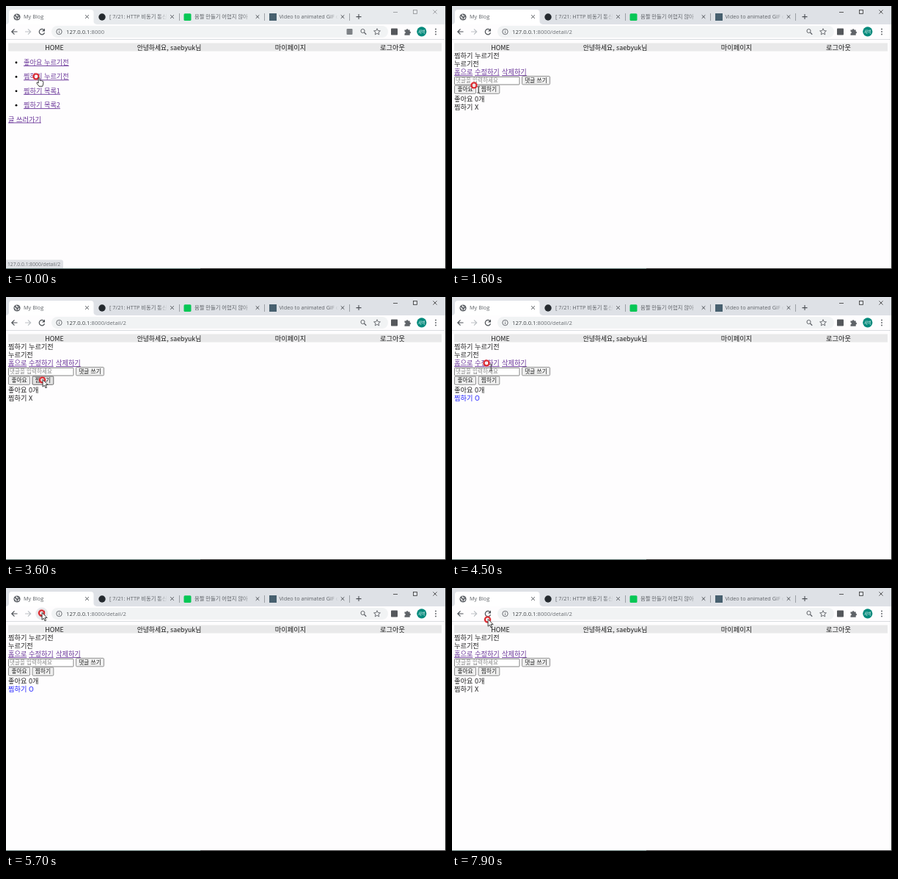
Recreate the animation shown at these times as an HTML page. Size 600 by 358 pixels, loop 8 s.

```html
<!DOCTYPE html>
<html lang="ko">
<head>
<meta charset="utf-8">
<title>My Blog</title>
<style>
  html, body { margin: 0; width: 100%; height: 100%; overflow: hidden; background: #fff; }
  svg { display: block; width: 600px; height: 358px; --strip: #dee1e6; --control: #333; }
  svg.inactive { --strip: #e7eaed; --control: #8e9195; }
  text { white-space: pre; }
  .ui { font-family: "Open Sans", "Noto Sans CJK KR", sans-serif; }
  .page { font-family: "Noto Sans CJK KR", "Noto Sans", sans-serif; font-weight: 300; fill-opacity: .88; }
  .link { text-decoration: underline; text-decoration-thickness: .7px; }
  .strip { fill: var(--strip); }
  .control { stroke: var(--control); }
  #fade stop { stop-color: var(--strip); }
</style>
</head>
<body>
<svg id="stage" viewBox="0 0 600 358" xmlns="http://www.w3.org/2000/svg">
  <defs>
    <linearGradient id="fade">
      <stop offset="0" stop-opacity="0"/>
      <stop offset="1"/>
    </linearGradient>
  </defs>
</svg>
<script>
const stage = document.getElementById('stage');

function add(parent, tag, attrs, content) {
  const node = document.createElementNS('http://www.w3.org/2000/svg', tag);
  for (const key in attrs) node.setAttribute(key, attrs[key]);
  if (content !== undefined) node.textContent = content;
  parent.appendChild(node);
  return node;
}
const group = (parent = stage) => add(parent, 'g', {});
const rect = (p, x, y, width, height, fill, more) =>
  add(p, 'rect', { x, y, width, height, fill, ...more });
const dot = (p, cx, cy, r, fill, more) => add(p, 'circle', { cx, cy, r, fill, ...more });
const line = (p, d, stroke = '#5f6368', width = 1.1, more) =>
  add(p, 'path', { d, stroke, 'stroke-width': width, fill: 'none', ...more });
const ui = (p, x, y, size, fill, str) =>
  add(p, 'text', { x, y, fill, 'font-size': size, class: 'ui' }, str);
const label = (p, x, y, str, more) =>
  add(p, 'text', { x, y, fill: '#000', 'font-size': 9.2, class: 'page', ...more }, str);
const link = (p, x, y, str) => label(p, x, y, str, { class: 'page link', fill: '#551a8b' });
const show = (node, on) => node.setAttribute('visibility', on ? 'visible' : 'hidden');
const cross = (x, y, r, color, width, more) =>
  line(stage, `M${x - r} ${y - r}l${2 * r} ${2 * r}m0 ${-2 * r}l${-2 * r} ${2 * r}`, color, width, more);

// Window and tab strip
rect(stage, 0, 0, 600, 358, '#fefdfe');
rect(stage, 0, 0, 600, 25, '', { class: 'strip' });
add(stage, 'path', { d: 'M0 25Q4 24.5 4 21V9Q4 5 8 5H115.500Q119.500 5 119.500 9V21Q119.500 24.500 124 25Z', fill: '#fff' });

function tabTitle(x, end, str) {
  ui(stage, x, 17, 7.3, '#5f6368', str);
  if (!end) return;
  rect(stage, end - 13, 9, 13, 12, 'url(#fade)');
  rect(stage, end, 9, 14, 12, '', { class: 'strip' });
}
tabTitle(24, 0, 'My Blog');
tabTitle(141, 220, '[ 7/21: HTTP 비동기 통신');
tabTitle(257, 336, '움짤 만들기 어렵지 않아');
tabTitle(372.5, 453, 'Video to animated GIF c');

dot(stage, 15, 15, 4.6, '#5f6368');
line(stage, 'M11.500 14.500l2 1.200 .5 2.500M14 11.500l.5 1.700 2.300 .5M16 17.500l2-2', '#fff', 1.2);
dot(stage, 131, 15, 4.7, '#24292e');
rect(stage, 242.5, 10.2, 10, 9.8, '#06c755', { rx: 1.5 });
rect(stage, 359, 10, 10, 10, '#47606f');
for (const x of [110.500, 226.500, 343, 459]) cross(x, 14.6, 2.3, '#4d5156', 1);
for (const x of [236.500, 352.500, 468.500]) line(stage, `M${x} 10V20`, '#8b8f94', 0.8);
line(stage, 'M477.500 14.600h7M481 11.100v7', '#4d5156', 1.1);
const control = { class: 'control' };
line(stage, 'M528 8.500h6', '', 0.8, control);
rect(stage, 555.500, 5.500, 5, 5, 'none', { 'stroke-width': 0.8, ...control });
cross(585, 8, 2.6, '', 0.8, control);

// Toolbar
line(stage, 'M0 45.500H598', '#dadce0', 1);
rect(stage, 62, 27, 459, 16, '#f1f3f4', { rx: 8 });
line(stage, 'M15.500 35H8M11.500 31.300L7.800 35l3.700 3.700', '#4d5156', 1.2);
line(stage, 'M26 35h7.500M30 31.300l3.700 3.700-3.700 3.700', '#bdc1c6', 1.2);
const halo = dot(stage, 48.8, 35, 8.5, '#e8eaed');
line(stage, 'M52 33A3.700 3.700 0 1 0 52.500 36.300', '#4d5156', 1.2);
add(stage, 'path', { d: 'M53 30.500v4h-4z', fill: '#4d5156' });
dot(stage, 72.500, 35, 3.7, 'none', { stroke: '#5f6368', 'stroke-width': 0.9 });
line(stage, 'M72.500 34.500v2.400M72.500 32.700v.9', '#5f6368', 0.9);

const url = ui(stage, 82, 38, 7.68, '#3c4043', '127.0.0.1');
const urlTail = add(url, 'tspan', { fill: '#6b6f74' });
const translate = rect(stage, 464.500, 31, 8, 8, '#7d8185', { rx: 1 });
dot(stage, 486.500, 34, 2.6, 'none', { stroke: '#5f6368', 'stroke-width': 1 });
line(stage, 'M488.500 36l2.700 2.700', '#5f6368', 1.3);
add(stage, 'path', {
  d: 'M506 30.700l1.250 2.900 3.150.25-2.400 2.050.75 3.050-2.750-1.650-2.750 1.650.75-3.050-2.400-2.050 3.150-.25z',
  fill: 'none', stroke: '#5f6368', 'stroke-width': 0.9
});
rect(stage, 525, 30.500, 9, 9, '#55585c', { rx: 0.8 });
add(stage, 'path', {
  d: 'M543.500 32.500h2.300a1.300 1.300 0 0 1 2.600 0h2.300v2.300a1.300 1.300 0 0 1 0 2.600v2.300h-7.200v-2.300a1.300 1.300 0 0 0 0-2.600z',
  fill: '#5f6368'
});
dot(stage, 566.800, 34.800, 6.6, '#00897b');
label(stage, 566.800, 36.700, '새벽', { fill: '#fff', 'font-size': 5.2, 'text-anchor': 'middle' });
for (const y of [31.500, 35, 38.500]) dot(stage, 586, y, 0.95, '#5f6368');

// Navigation shared by both pages
rect(stage, 3, 50.500, 591, 11, '#e9e9ea');
const nav = (x, str, size = 9.2) =>
  label(stage, x, 59.500, str, { 'text-anchor': 'middle', 'font-size': size });
nav(66, 'HOME', 8.8);
nav(222.500, '안녕하세요, saebyuk님', 8.8);
nav(388, '마이페이지');
nav(527, '로그아웃');

// List page
const home = group();
['좋아요 누르기전', '찜하기 누르기전', '찜하기 목록1', '찜하기 목록2'].forEach((str, i) => {
  const y = 80 + i * 19.400;
  dot(home, 14, y - 3, 1.4, '#000');
  link(home, 24, y, str);
});
link(home, 3, 157.500, '글 쓰러가기');
add(home, 'path', { d: 'M0 345.500H75Q78 345.500 78 348.500V358H0Z', fill: '#dfe1e5' });
ui(home, 2, 353.600, 6.75, '#6b6f74', '127.0.0.1:8000/detail/2');

// Detail page
const detail = group();
label(detail, 3, 70.800, '찜하기 누르기전');
label(detail, 3, 81.800, '누르기전');
link(detail, 3, 93.200, '홈으로');
link(detail, 31, 93.200, '수정하기');
link(detail, 68, 93.200, '삭제하기');
rect(detail, 3.500, 96.500, 88.500, 10.500, '#fff', { stroke: '#767676', 'stroke-width': 0.9, rx: 0.7 });
label(detail, 5, 104.300, '댓글을 입력하세요', { 'font-size': 7.6, fill: '#757575' });

function button(x, y, width, str) {
  const box = rect(detail, x, y, width, 11.300, '#efefef', { stroke: '#767676', 'stroke-width': 0.8, rx: 1.2 });
  label(detail, x + width / 2, y + 8.400, str, { 'font-size': 7.7, 'text-anchor': 'middle' });
  return { box, x, y, width };
}
const buttons = [
  button(95.500, 95.600, 38, '댓글 쓰기'),
  button(3.500, 108, 29, '좋아요'),
  button(36, 108, 28.800, '찜하기')
];
label(detail, 3, 129.700, '좋아요 0개');
const wish = label(detail, 3, 140.700, '찜하기 X');

// Window edges
rect(stage, 599, 0, 1, 358, '#202020');
rect(stage, 0, 357, 265, 1, '#5b706e');
rect(stage, 265, 357, 335, 1, '#303030');

// Pointer: the shapes hang from the centre of the ring
const pointer = group();
dot(pointer, 0, 0, 5, 'none', { stroke: '#f4a4a6', 'stroke-width': 0.7, 'stroke-opacity': 0.6 });
dot(pointer, 0, 0, 3.5, '#fff', { 'fill-opacity': 0.65, stroke: '#dc2a30', 'stroke-width': 2.2 });
const shapes = {
  arrow: group(pointer),
  beam: group(pointer),
  hand: group(pointer)
};
const outline = { fill: '#fff', stroke: '#111', 'stroke-width': 0.8, 'stroke-linejoin': 'round' };
add(shapes.arrow, 'path', { d: 'M.6-.6V9.200L2.900 7.200 4.500 10.800 6.100 10.100 4.500 6.600H7.600Z', ...outline });
line(shapes.beam, 'M4.300 1.800H5.600L6.200 2.300 6.800 1.800H8.100M6.200 2.300V9.700M4.300 10.200H5.600L6.200 9.700 6.800 10.200H8.100', '#222', 0.8);
add(shapes.hand, 'path', {
  d: 'M3.200 1.300Q4.200.2 5 1.300V4.700Q6 4 6.700 5 7.700 4.400 8.300 5.400 9.600 5 9.800 6.500V9.200L8.800 12.500H4L1 8.500Q.5 7.200 2 7.200L3.200 8.200Z',
  transform: 'translate(0 .8)', ...outline
});

// Pointer path: time in ms, x, y
const path = [
  [0, 41, 96], [600, 41, 96], [900, 38, 118], [1200, 37, 123], [1500, 44, 112],
  [1600, 30, 108], [1700, 39, 95], [1800, 45, 82], [1900, 45, 82],
  [2000, 48, 48], [2100, 48, 35], [2200, 48, 37], [2400, 49, 109],
  [3000, 49, 109], [3300, 51, 112], [3600, 49.500, 113], [3900, 49.500, 113],
  [4100, 41, 128], [4300, 41, 127], [4500, 47, 90], [4800, 48, 36],
  [5000, 48, 35], [5200, 43, 126], [5400, 42, 128], [5600, 47, 55],
  [5700, 48.500, 34], [5900, 48.500, 36], [6200, 43, 126], [6500, 40, 127],
  [6800, 40.500, 101], [7100, 50, 113], [7500, 50, 113], [7700, 49, 86],
  [7900, 48.500, 43], [8000, 48.500, 43]
];

function pointerAt(t) {
  const next = path.findIndex(p => p[0] > t);
  const [t0, x0, y0] = path[next - 1];
  const [t1, x1, y1] = path[next];
  const k = (t - t0) / (t1 - t0);
  return [x0 + (x1 - x0) * k, y0 + (y1 - y0) * k];
}

function shapeAt(onList, x, y, onButton) {
  if (onList) return 'hand';
  return y < 62 || onButton ? 'arrow' : 'beam';
}

function render(time) {
  const t = Math.floor((time % 8000) / 100) * 100;
  const onList = t < 100;
  const wished = t >= 3700 && t < 7500;
  const [x, y] = pointerAt(t);

  stage.classList.toggle('inactive', t < 700);
  show(home, onList);
  show(detail, !onList);
  show(translate, onList);
  urlTail.textContent = onList ? ':8000' : ':8000/detail/2';
  wish.textContent = wished ? '찜하기 O' : '찜하기 X';
  wish.setAttribute('fill', wished ? '#0000ff' : '#000');
  show(halo, Math.hypot(x - 48.800, y - 35) < 7);

  let onButton = false;
  for (const b of buttons) {
    const over = !onList && x > b.x && x < b.x + b.width && y > b.y && y < b.y + 11.300;
    onButton = onButton || over;
    b.box.setAttribute('fill', over ? '#e3e3e3' : '#efefef');
    b.box.setAttribute('stroke', over ? '#4a4a4a' : '#767676');
  }
  const active = shapeAt(onList, x, y, onButton);
  for (const name in shapes) show(shapes[name], name === active);
  pointer.setAttribute('transform', `translate(${x} ${y})`);
}

const start = performance.now();
function tick() {
  render(performance.now() - start);
  requestAnimationFrame(tick);
}
tick();
</script>
</body>
</html>
```
